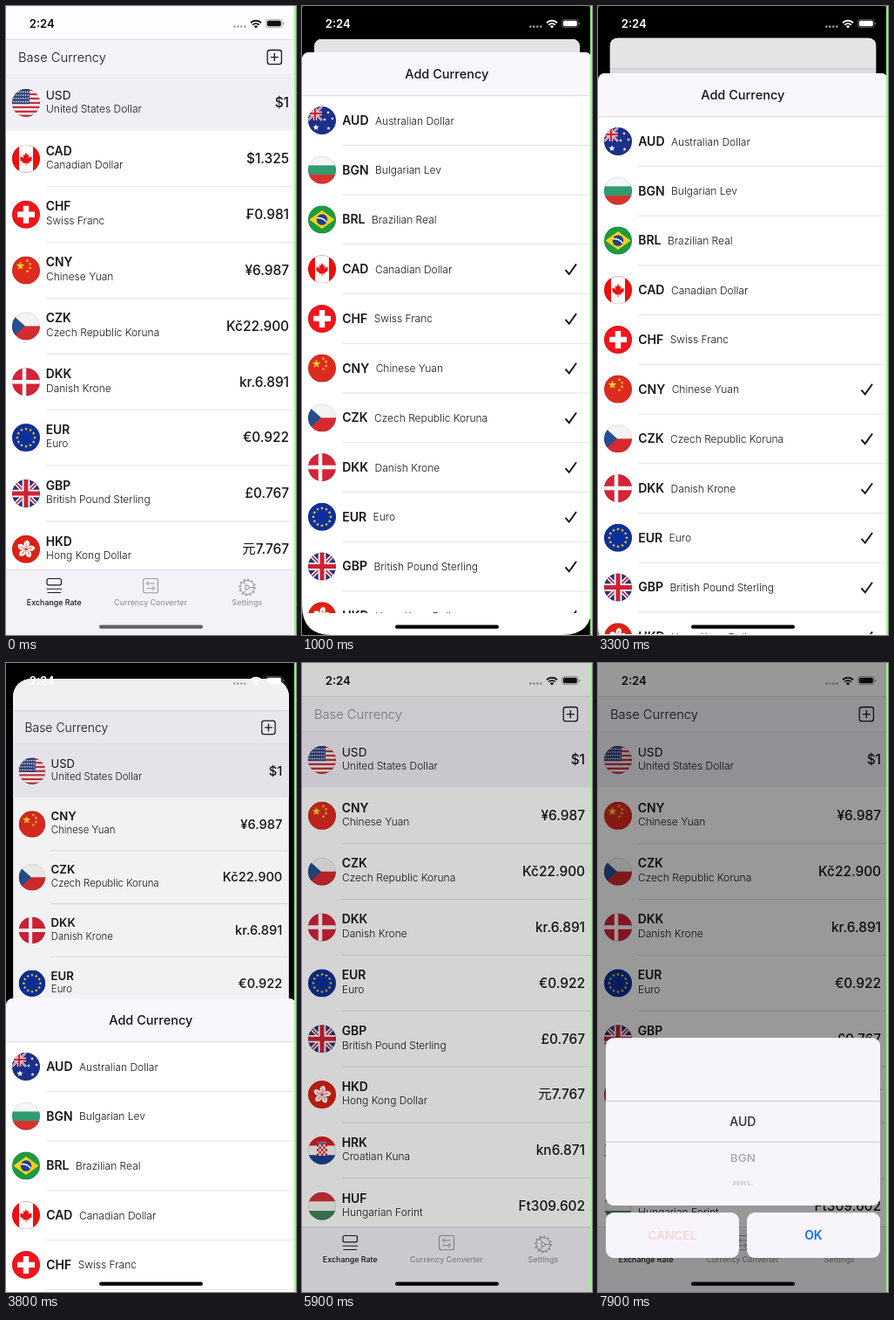
An HTML page for the animation above (8 s loop, 333 by 720 pixels).

```html
<!DOCTYPE html>
<html lang="en">
<head>
<meta charset="utf-8">
<title>Currency list</title>
<style>
html, body { margin: 0; width: 100%; height: 100%; overflow: hidden; background: #000; }
svg { display: block; width: 100%; height: 100%; font-family: Inter, "Noto Sans CJK SC", "Noto Sans CJK JP", "Noto Sans", sans-serif; }
</style>
</head>
<body>
<svg id="stage" viewBox="0 0 333 720"></svg>
<script>
const LOOP = 8000, STEP = 100;
const ROW = 63.85, SHEET_ROW = 56.72, SHEET_TOP = 53;

const currencies = [
  ['AUD', 'Australian Dollar'],
  ['BGN', 'Bulgarian Lev'],
  ['BRL', 'Brazilian Real'],
  ['CAD', 'Canadian Dollar', '$1.325'],
  ['CHF', 'Swiss Franc', '₣0.981'],
  ['CNY', 'Chinese Yuan', '¥6.987'],
  ['CZK', 'Czech Republic Koruna', 'Kč22.900'],
  ['DKK', 'Danish Krone', 'kr.6.891'],
  ['EUR', 'Euro', '€0.922'],
  ['GBP', 'British Pound Sterling', '£0.767'],
  ['HKD', 'Hong Kong Dollar', '元7.767'],
  ['HRK', 'Croatian Kuna', 'kn6.871'],
  ['HUF', 'Hungarian Forint', 'Ft309.602']
];
const base = ['USD', 'United States Dollar', '$1'];
const listed = currencies.filter(c => c[2]);

// Markup helpers
const rect = (x, y, w, h, fill, more = '') =>
  `<rect x="${x}" y="${y}" width="${w}" height="${h}" fill="${fill}" ${more}/>`;
const line = (d, color, w, more = '') =>
  `<path d="${d}" fill="none" stroke="${color}" stroke-width="${w}" ${more}/>`;
const fillPath = (d, color) => `<path d="${d}" fill="${color}"/>`;
const dot = (x, y, r, fill) => `<circle cx="${x}" cy="${y}" r="${r}" fill="${fill}"/>`;
const text = (x, y, str, size, weight = 400, more = '') =>
  `<text x="${x}" y="${y}" font-size="${size}" font-weight="${weight}" ${more}>${str}</text>`;
const centered = 'text-anchor="middle"';
const repeat = (n, fn) => Array.from({ length: n }, (_, i) => fn(i)).join('');

// Flags, drawn around 0,0 inside a circle of radius 16
const field = color => rect(-16, -16, 32, 32, color);
const bands = (...colors) =>
  colors.map((c, i) => rect(-16, -16 + i * 32 / colors.length, 32, 32 / colors.length + .1, c)).join('');
const star = (x, y, r, fill) => {
  const pts = Array.from({ length: 10 }, (_, i) => {
    const a = i * Math.PI / 5, k = i % 2 ? r * .42 : r;
    return (x + k * Math.sin(a)).toFixed(2) + ',' + (y - k * Math.cos(a)).toFixed(2);
  });
  return `<polygon points="${pts.join(' ')}" fill="${fill}"/>`;
};
const cross = (x, w, color) => line(`M${x}-16V16M-16 0H16`, color, w);
const diagonals = (w, color) => line('M-16-16L16 16M16-16L-16 16', color, w);
const union = field('#21357f') + diagonals(4.6, '#fff') + diagonals(1.8, '#d02035') +
  cross(0, 8.6, '#fff') + cross(0, 5, '#d02035');

const flags = {
  USD: repeat(13, i => rect(-16, -16 + i * 32 / 13, 32, 2.5, i % 2 ? '#f5f1f1' : '#c2333f')) +
    rect(-16, -16, 20, 17.2, '#34437c') +
    repeat(28, i => star(-14 + i % 7 * 2.7, -12.6 + Math.floor(i / 7) * 3.7, 1.2, '#fff')),
  AUD: field('#1c2f8a') + `<g transform="translate(-8 -8) scale(.5)">${union}</g>` +
    star(-7, 8, 3.8, '#fff') + star(7, -9, 2, '#fff') + star(12, -2, 2, '#fff') +
    star(3, -1, 2, '#fff') + star(7.5, 9, 2.2, '#fff'),
  BGN: bands('#f6f6f6', '#2f9b70', '#d8322c'),
  BRL: field('#1d9a42') + fillPath('M-14.5 0L0-10.5 14.5 0 0 10.5z', '#fbd116') +
    dot(0, 0, 6.3, '#20408f') + line('M-6-1.8Q1-2.5 5.4 3', '#fff', 1.5),
  CAD: field('#f20d0d') + rect(-8, -16, 16, 32, '#fbfbfb') +
    fillPath('M0-7L1.7-3.9 3.4-4.8 2.7-.7 4.8-2.8 5.3-1.6 7-1.8 6.2 1 7 1.6 3.2 4.2 3.6 5.4.4 5V8H-.4V5L-3.6 5.4-3.2 4.2-7 1.6-6.2 1-7-1.8-5.3-1.6-4.8-2.8-2.7-.7-3.4-4.8-1.7-3.9z', '#ee1010'),
  CHF: field('#f3141c') + line('M0-10V10M-10 0H10', '#fff', 6.4),
  CNY: field('#de2b20') + star(-6.5, -5, 5, '#ffd31c') + star(1.5, -11, 2, '#ffd31c') +
    star(4.6, -7.4, 2, '#ffd31c') + star(4.6, -2.6, 2, '#ffd31c') + star(1.5, 1, 2, '#ffd31c'),
  CZK: bands('#f4f4f5', '#d72a2f') + fillPath('M-16-13.5L-1 0-16 13.5z', '#23508f'),
  DKK: field('#d52338') + cross(-2, 4.4, '#fff'),
  EUR: field('#0b2f9c') + repeat(12, i =>
    star(10 * Math.sin(i * Math.PI / 6), -10 * Math.cos(i * Math.PI / 6), 2, '#ffd520')),
  GBP: union,
  HKD: field('#dc2113') + repeat(5, i =>
    `<path d="M0-1C-5-4-4-9 .5-10.5 4.5-8 3.5-4 0-1z" fill="#fff" transform="rotate(${i * 72 + 8})"/>`) +
    repeat(5, i => `<path d="M0-2.5Q-1.5-5 .3-7" fill="none" stroke="#dc2113" stroke-width=".7" transform="rotate(${i * 72 + 8})"/>`),
  HRK: bands('#e01c1c', '#f7f7f7', '#1d3f96') + rect(-6, -7, 12, 13, '#fff') +
    repeat(25, i => i % 2 ? '' : rect(-6 + i % 5 * 2.4, -7 + Math.floor(i / 5) * 2.6, 2.4, 2.6, '#e01c1c')) +
    line('M-5-9H5', '#5b8ec9', 2.6),
  HUF: bands('#d3313b', '#f6f6f6', '#3f8355')
};
const flagDefs = Object.keys(flags).map(k =>
  `<g id="flag${k}"><g clip-path="url(#disc)">${flags[k]}</g><circle r="15.6" fill="none" stroke="#000" stroke-opacity=".12" stroke-width=".8"/></g>`).join('');
const flag = (code, y) => `<use href="#flag${code}" x="23" y="${y}"/>`;

// Main page
const rateRow = ([code, name, amount], i) => {
  const y = 111 + i * ROW;
  return flag(code, y) +
    text(45.7, y - 4.3, code, i ? 13.9 : 13.7, i ? 600 : 400) +
    text(46, y + 11.3, name, 12, 300) +
    text(325, y + 5.3, amount, 15.4, 500, 'text-anchor="end"') +
    (i ? line(`M46 ${y + 31.9}H333`, '#dfdfe2', .9) : '');
};
const rateRows = skip => [base, ...listed.slice(skip, skip + 8)].map(rateRow).join('');

const grey = '#97969b';
const tabBar = rect(0, 645, 333, 75, '#f4f2f8') + line('M0 645.5H333', '#d3d2d7', .8) +
  rect(47, 655.5, 16.5, 7.3, 'none', 'rx="2" stroke="#1a1a1c" stroke-width="1.2"') +
  line('M46.5 667.2H64M47.5 671.5H63', '#1a1a1c', 1.1) +
  rect(157.7, 655.5, 16.8, 16.3, 'none', `rx="2" stroke="${grey}" stroke-width="1.1"`) +
  line('M170.5 661H161.5M164 658.5l-2.7 2.5 2.7 2.5M161.5 666.7H170.5M168 664.2l2.7 2.5-2.7 2.5', grey, 1) +
  `<g transform="translate(277 665.5)" fill="none" stroke="${grey}"><circle r="8" stroke-width="1"/>` +
  '<circle r="9.1" stroke-width="1.5" stroke-dasharray="2 2.765"/><circle r="2.2" stroke-width="1"/>' +
  '<path d="M2.3 0H7.8M-1.2-2L-3.9-6.8M-1.2 2L-3.9 6.8" stroke-width="1"/></g>' +
  text(55.3, 686.2, 'Exchange Rate', 8.9, 500, centered) +
  text(166, 686.2, 'Currency Converter', 8.9, 500, `${centered} fill="${grey}"`) +
  text(277, 686.2, 'Settings', 8.9, 500, `${centered} fill="${grey}"`);

const page = rect(0, 0, 333, 720, '#fff') + rect(0, 0, 333, 38, '#fdfcfe') +
  rect(0, 38, 333, 40.5, '#f5f3f9') + rect(0, 78.5, 333, 64, '#f1eff6') +
  line('M0 38.3H333', '#d9d8dd', .9) + line('M0 78.6H333', '#e3e2e7', .8) +
  text(14, 63.7, 'Base Currency', 14.7, 300, 'id="heading"') +
  rect(300.2, 50.5, 16.2, 16.2, 'none', 'rx="2.8" stroke="#1a1a1c" stroke-width="1.3"') +
  line('M303.8 58.6H312.8M308.3 54.1V63.1', '#1a1a1c', 1.4) +
  '<g id="rates"></g>' + tabBar;

const status = text(26.7, 25, '2:24', 13.2, 600, 'fill="currentColor"') +
  repeat(4, i => dot(262.3 + i * 4, 23.6, 1.3, '#a3a2a7')) +
  line('M281 19.2a8.6 8.6 0 0 1 12 0M283.2 21.6a5.5 5.5 0 0 1 7.6 0', 'currentColor', 1.9) +
  fillPath('M284.9 23.4a3 3 0 0 1 4.2 0L287 25.6z', 'currentColor') +
  rect(298.4, 15.4, 18.8, 9.2, 'none', 'rx="2.8" stroke="currentColor" stroke-opacity=".38" stroke-width=".9"') +
  rect(299.8, 16.8, 16, 6.4, 'currentColor', 'rx="1.6"') +
  fillPath('M318.6 18.4q1.7 1.6 0 3.2z', 'currentColor');

// "Add Currency" sheet, in its own coordinates
const sheet = '<path d="M0 667V9Q0 0 9 0H324Q333 0 333 9V633Q333 667 299 667H34Q0 667 0 633z" fill="#fff"/>' +
  '<path d="M0 49.5V9Q0 0 9 0H324Q333 0 333 9V49.5z" fill="#f9f7fc"/>' +
  line('M0 49.7H333', '#d5d4d9', .9) +
  text(166.3, 30.2, 'Add Currency', 14.5, 500, centered) +
  '<g clip-path="url(#table)">' + currencies.slice(0, 11).map(([code, name, amount], i) => {
    const y = 78 + i * SHEET_ROW;
    return flag(code, y) +
      `<text x="46.2" y="${y + 5}" font-size="14" font-weight="600">${code}<tspan dx="7.5" dy="-.4" font-size="12" font-weight="300">${name}</tspan></text>` +
      (amount ? line(`M302.5 ${y + 1}l4.2 4.8 8.3-11.6`, '#111', 1.9, `id="check${code}"`) : '') +
      line(`M46 ${y + 28.4}H333`, '#dfdfe2', .9);
  }).join('') + '</g>';

// Currency picker
const squashed = (y, k, str, size, color) =>
  `<g transform="translate(166.3 ${y}) scale(1 ${k})">${text(0, 0, str, size, 500, `${centered} fill="${color}"`)}</g>`;
const panel = '#f7f5fb';
const picker = rect(9, 429, 315, 192, panel, 'rx="9"') +
  rect(9, 629, 153, 52, panel, 'rx="9"') + rect(171, 629, 153, 52, panel, 'rx="9"') +
  line('M9 501.5H324M9 548.3H324', '#bfbec4', .8) +
  text(166.3, 529.8, 'AUD', 14, 500, `${centered} fill="#2c2b30"`) +
  squashed(571.4, .88, 'BGN', 13.4, '#a3a2a7') + squashed(598, .5, 'BRL', 12.4, '#c3c2c7') +
  text(85.5, 660.2, 'CANCEL', 13.7, 500, `${centered} id="cancel" fill="#ff3b30"`) +
  text(247.3, 660.2, 'OK', 13.8, 600, `${centered} fill="#0a6cf5"`);

document.getElementById('stage').innerHTML =
  `<defs><clipPath id="disc"><circle r="16"/></clipPath>
  <clipPath id="table"><rect y="49" width="333" height="593"/></clipPath>
  <clipPath id="cardClip"><rect id="cardShape" width="333" height="720"/></clipPath>${flagDefs}</defs>` +
  rect(0, 0, 333, 720, '#000') +
  `<g id="card"><g clip-path="url(#cardClip)" fill="#151517">${page}${rect(0, 0, 333, 720, '#000', 'id="shade"')}</g></g>` +
  `<g id="status">${status}</g><g id="sheet" fill="#151517">${sheet}</g>` +
  rect(0, 0, 333, 720, '#000', 'id="dim"') + `<g id="picker">${picker}</g>` +
  rect(107, 708.4, 119, 4.4, '#000', 'rx="2.2" id="homeBar"') + rect(331, 0, 2, 720, '#8dff7c');

const el = id => document.getElementById(id);
const set = (id, name, value) => el(id).setAttribute(name, value);
const clamp = x => Math.max(0, Math.min(1, x));
const spring = ms => { const x = Math.max(0, ms) * .014; return 1 - (1 + x) * Math.exp(-x); };

function sheetY(t) {
  if (t < 500 || t >= 4400) return 720;
  if (t < 1000) return 720 - (720 - SHEET_TOP) * spring(t - 465);
  if (t < 3300) return SHEET_TOP;
  if (t < 4000) {
    const k = clamp((t - 3300) / 500);
    return 77 + 307 * k * k * (3 - 2 * k);
  }
  return 384 + 336 * spring(t - 3950);
}

let skipped = -1;
function draw(t) {
  const removed = (t >= 1800) + (t >= 2400);
  if (removed !== skipped) {
    skipped = removed;
    el('rates').innerHTML = rateRows(removed);
    set('checkCAD', 'opacity', removed > 0 ? 0 : 1);
    set('checkCHF', 'opacity', removed > 1 ? 0 : 1);
  }

  const y = sheetY(t), p = (720 - y) / (720 - SHEET_TOP);
  const inset = 14 * p ** .8, top = 38 * p ** 1.08;
  set('sheet', 'transform', `translate(0 ${y})`);
  set('sheet', 'visibility', p > 0 ? 'visible' : 'hidden');
  set('card', 'transform', `translate(${inset} ${top}) scale(${1 - inset / 166.5})`);
  set('cardShape', 'rx', p > 0 ? 34 - 25 * p : 0);
  set('shade', 'opacity', .1 * p);
  set('status', 'color', t >= 600 && t < 4100 ? '#fff' : '#111');
  set('homeBar', 'opacity', t < 500 ? .6 : 1);

  const press = t < 5700 ? 0 : t < 5900 ? (t - 5600) / 300 : 1 - clamp((t - 5900) / 300);
  set('heading', 'opacity', 1 - .52 * press);
  set('dim', 'opacity', .4 * clamp((t - 5800) / 240));
  const rise = clamp((t - 5900) / 500);
  set('picker', 'transform', `translate(0 ${300 * (1 - rise) ** 2})`);
  set('cancel', 'opacity', t >= 7900 ? .2 : 1);
}

function tick() {
  const t = performance.now() % LOOP;
  draw(Math.floor(t / STEP) * STEP);
  requestAnimationFrame(tick);
}
tick();
</script>
</body>
</html>
```
